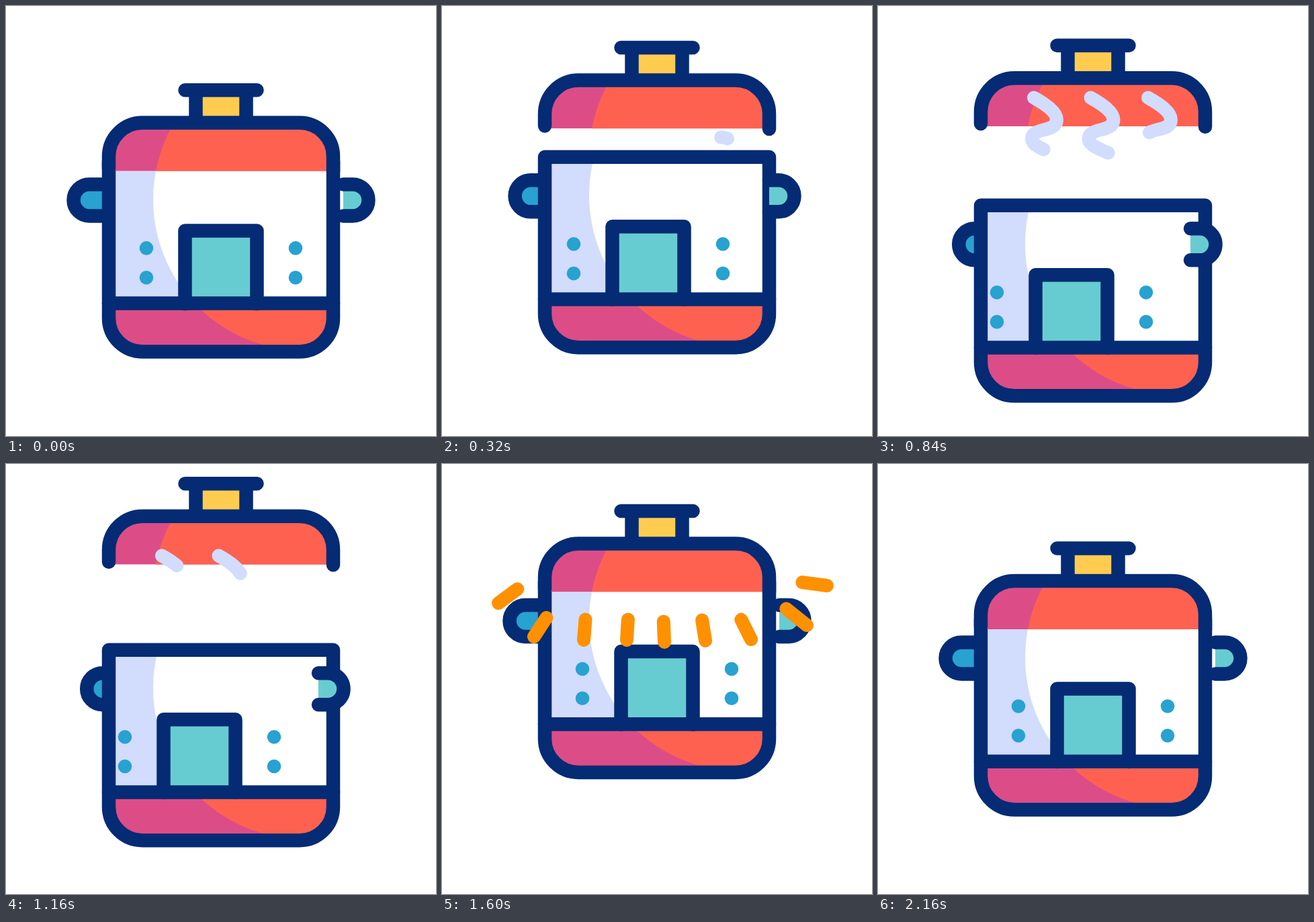
An HTML page for the animation above (3020 ms loop, 640 by 640 pixels).

```html
<!DOCTYPE html>
<html lang="en">
<head>
<meta charset="utf-8">
<title>Rice cooker</title>
<style>
  html, body { margin: 0; width: 100%; height: 100%; overflow: hidden; background: #fff; }
  svg { display: block; width: 100%; height: 100%; }
  .line { fill: none; stroke: #042b74; stroke-width: 20.5; stroke-linecap: round; stroke-linejoin: round; }
  .steam { fill: none; stroke: #d2dcfd; stroke-width: 20; stroke-linecap: round; stroke-linejoin: round; }
  .spark { stroke: #ff9100; stroke-width: 20; stroke-linecap: round; }
  .aqua { fill: #67ccd1; }
  .blue { fill: #28a2d0; }
  .red { fill: #ff6151; }
  .pink { fill: #dc4d87; }
</style>
</head>
<body>
<svg viewBox="0 0 640 640">
  <defs>
    <clipPath id="potShape"><path d="M153 231H487V464.500a50 50 0 0 1-50 50H203a50 50 0 0 1-50-50Z"/></clipPath>
    <clipPath id="baseShape"><rect x="153" y="443" width="334" height="72"/></clipPath>
    <clipPath id="lidShape"><path d="M153 246V224a50 50 0 0 1 50-50H437a50 50 0 0 1 50 50V246Z"/></clipPath>
  </defs>
  <g id="pot">
    <g id="leftHandle">
      <path class="blue" d="M163 265.500H124a23.500 23.500 0 0 0 0 47H163Z"/>
      <path class="line" d="M163 265.500H124a23.500 23.500 0 0 0 0 47H163"/>
    </g>
    <g clip-path="url(#potShape)">
      <rect x="153" y="231" width="334" height="284" fill="#d2dcfd"/>
      <circle cx="444" cy="288" r="225" fill="#fff"/>
      <g clip-path="url(#baseShape)">
        <rect class="pink" x="153" y="443" width="334" height="72"/>
        <circle class="red" cx="444" cy="288" r="225"/>
      </g>
    </g>
    <path class="line" d="M153 231H487V464.500a50 50 0 0 1-50 50H203a50 50 0 0 1-50-50Z"/>
    <g id="panel">
      <path class="aqua" d="M266.500 443V334.500H373.500V443Z"/>
      <path class="line" d="M266.500 443V334.500H373.500V443"/>
      <g class="blue">
        <circle cx="209" cy="360.500" r="10.300"/><circle cx="209" cy="404.300" r="10.300"/>
        <circle cx="431" cy="360.500" r="10.300"/><circle cx="431" cy="404.300" r="10.300"/>
      </g>
    </g>
    <path class="line" d="M153 442.700H487"/>
    <g id="rightHandle">
      <path class="aqua" d="M502 265.500H516a23.500 23.500 0 0 1 0 47H502Z"/>
      <path class="line" d="M502 265.500H516a23.500 23.500 0 0 1 0 47H502"/>
    </g>
  </g>
  <g id="sparks"></g>
  <g id="lid">
    <rect x="283" y="126" width="74" height="48" fill="#ffcc50"/>
    <path class="line" d="M266.500 125.500H373.500M282.500 126V174M357.500 126V174"/>
    <g clip-path="url(#lidShape)">
      <rect class="pink" x="153" y="174" width="334" height="72"/>
      <circle class="red" cx="444" cy="288" r="225"/>
    </g>
    <path class="line" d="M153 242V224a50 50 0 0 1 50-50H437a50 50 0 0 1 50 50V246.500"/>
  </g>
  <g id="steams"></g>
</svg>
<script>
const LOOP = 3020;
const $ = id => document.getElementById(id);
const clamp = v => Math.max(0, Math.min(1, v));
const ramp = (t, from, span) => clamp((t - from) / span);

function add(parent, tag, attrs) {
  const el = document.createElementNS('http://www.w3.org/2000/svg', tag);
  for (const key in attrs) el.setAttribute(key, attrs[key]);
  return parent.appendChild(el);
}

const move = (id, x, y) => $(id).setAttribute('transform', `translate(${x} ${y})`);

// Smooth curve through [time, value] keys that never overshoots between them.
function curve(keys) {
  const slope = i => (keys[i + 1][1] - keys[i][1]) / (keys[i + 1][0] - keys[i][0]);
  const tangents = keys.map((_, i) => {
    if (i === keys.length - 1) return 0;
    if (i === 0) return slope(0);
    const a = slope(i - 1), b = slope(i);
    return a * b > 0 ? 2 * a * b / (a + b) : 0;
  });
  return t => {
    const last = keys.length - 1;
    if (t >= keys[last][0]) return keys[last][1];
    const i = keys.findIndex((key, n) => n < last && t < keys[n + 1][0]);
    const [t0, v0] = keys[i], [t1, v1] = keys[i + 1];
    const span = t1 - t0, u = (t - t0) / span, w = 1 - u;
    return v0 * w * w * (1 + 2 * u) + v1 * u * u * (3 - 2 * u)
      + span * u * w * (tangents[i] * w - tangents[i + 1] * u);
  };
}

const lidY = curve([[0, 0], [160, -32], [320, -63.3], [500, -83.5], [840, -66.7], [1080, -94],
  [1160, -96.3], [1420, -41.3], [1600, -55.5], [1800, -31], [2160, 0]]);
const potY = curve([[0, 0], [160, -12], [320, -6.3], [540, 54], [700, 73], [840, 65.9], [1080, 49],
  [1160, 45.8], [1420, -39.3], [1600, -55.5], [1800, -31], [2160, 0]]);

const wave = 'C-3 44 34 52 34 33C34 21 16 9 0 0';
const longSteam = 'M26 82C10 75-3 70-3 61' + wave;
const shortSteam = 'M23 61C12 55-4 64 0 54C5 45 34 50 34 33C34 21 16 9 0 0';
const steams = [
  { x: 232, d: longSteam, grow: 365, fade: 800, span: 450 },
  { x: 316.5, d: longSteam, grow: 410, fade: 850, span: 450 },
  { x: 402, d: shortSteam, grow: 285, fade: 735, span: 415 }
].map(s => {
  const el = add($('steams'), 'path', { class: 'steam', d: s.d, transform: `translate(${s.x} 136.500)` });
  return { ...s, el, length: el.getTotalLength() };
});

// Each ray: start point and the way it travels.
const sparks = [
  [130, 173, -46, 34], [167, 211, -30, 46], [215, 212, -4, 50], [278, 212, -3, 50], [329, 215, 2, 50],
  [384, 213, 8, 50], [436, 213, 24, 48], [493, 200, 50, 40], [513, 173, 60, 8]
].map(ray => ({ ray, el: add($('sparks'), 'line', { class: 'spark' }) }));

function drawSteam({ el, length, grow, fade, span }, t) {
  const head = ramp(t, grow, 430) * length;
  const tail = ramp(t, fade, span) * length;
  const shown = head > tail;
  el.style.display = shown ? '' : 'none';
  if (shown) el.setAttribute('stroke-dasharray', `0 ${tail} ${head - tail} ${length * 2}`);
  // A leading zero dash would paint a dot at the path's start.
  if (shown) {
    el.setAttribute('stroke-dasharray', `${head - tail} ${length * 2}`);
    el.setAttribute('stroke-dashoffset', -tail);
  }
}

function drawSpark({ ray: [x, y, dx, dy], el }, t) {
  const head = ramp(t, 1400, 180), tail = ramp(t, 1500, 260);
  el.style.display = head > tail ? '' : 'none';
  const ends = { x1: x + dx * tail, y1: y + dy * tail, x2: x + dx * head, y2: y + dy * head };
  for (const key in ends) el.setAttribute(key, ends[key]);
}

function draw(t) {
  const turn = ramp(t, 0, 790) * (1 - ramp(t, 1180, 310));
  move('lid', 0, lidY(t));
  move('pot', 0, potY(t));
  move('panel', -32 * turn, 0);
  move('leftHandle', 19.7 * turn, 0);
  move('rightHandle', -37 * turn, 0);
  steams.forEach(s => drawSteam(s, t));
  sparks.forEach(s => drawSpark(s, t));
}

const start = performance.now();
function tick() {
  draw((performance.now() - start) % LOOP);
  requestAnimationFrame(tick);
}
tick();
</script>
</body>
</html>
```
